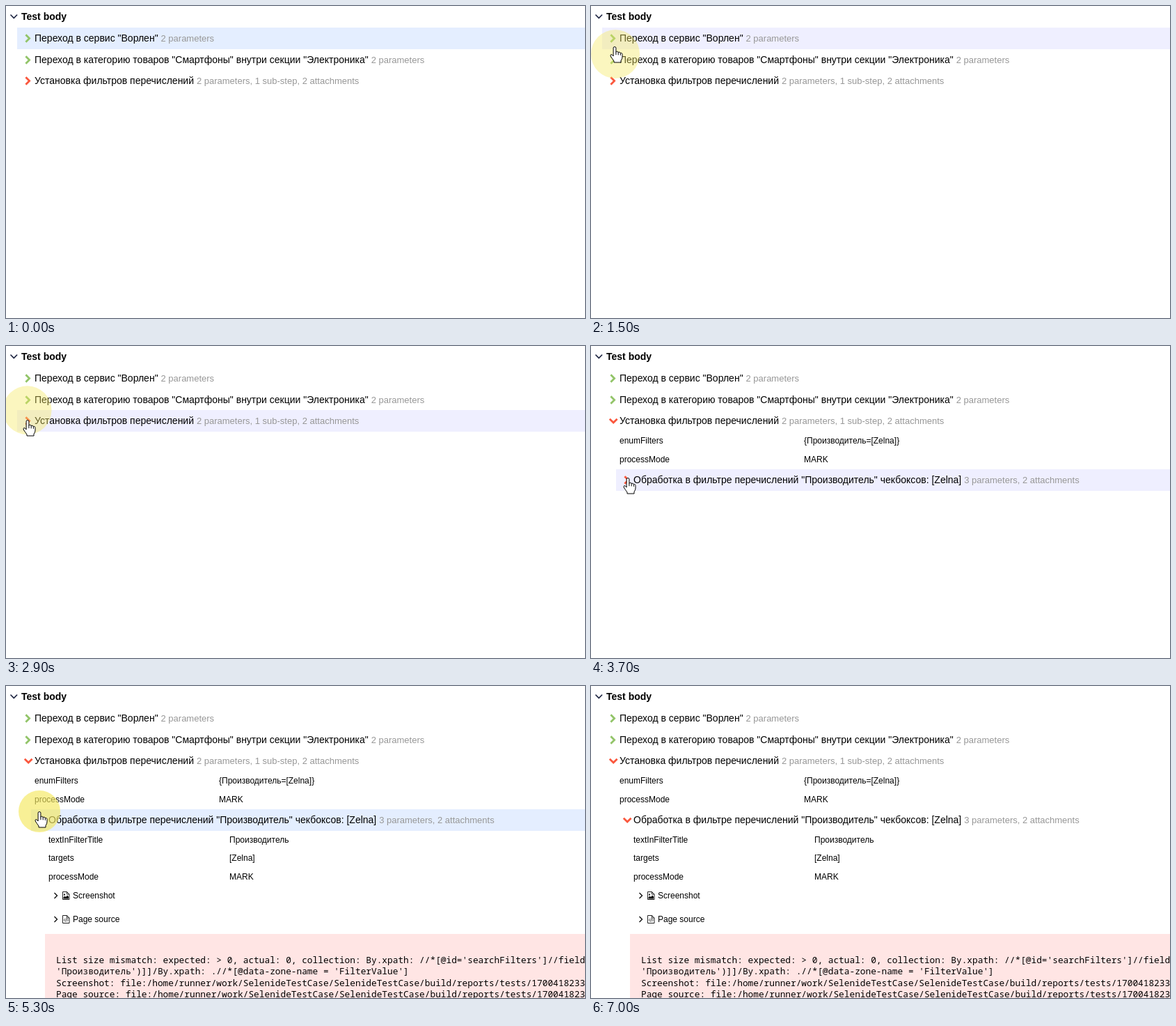
Recreate the animation shown at these times as an HTML page. Size 832 px wide and 448 px high, loop 8 s.

```html
<!DOCTYPE html>
<html lang="ru">
<head>
<meta charset="utf-8">
<title>Test body</title>
<style>
html, body { margin: 0; width: 100%; height: 100%; overflow: hidden; background: #fff; }
body { position: relative; font: 14px "Liberation Sans", Arial, sans-serif; color: #000; }
div { position: absolute; white-space: pre; }
svg { position: absolute; left: 0; top: 0; width: 1px; height: 1px; overflow: visible; fill: none; }
#head { left: 22px; top: 0; line-height: 30px; font-weight: bold; }
.row { right: 0; height: 31px; line-height: 31px; padding-left: 25px; }
.row small { font-size: 13px; color: #979797; }
.param { height: 26px; line-height: 26px; font-size: 12px; }
.file { left: 56px; right: 0; height: 27px; line-height: 27px; padding-left: 40px; font-size: 12px; }
#error { left: 56px; right: 0; top: 356px; height: 92px; background: #ffe5e4; overflow: hidden; }
#error div { left: 16px; top: 29px; font: 12.8px/16.4px "Noto Sans Mono", "DejaVu Sans Mono", monospace; }
#halo { width: 70px; height: 70px; border-radius: 50%; background: #f5e960; }
</style>
</head>
<body>
<script>
const GREEN = '#92c468', RED = '#fa573d';
const SERVICE = 'Ворлен', MAKER = 'Zelna';
const RIGHT = 'M12.4 10.3l5.2 5.2l-5.2 5.2', DOWN = 'M10.8 12.8l5.4 5.2l5.4-5.2';

const icon = (d, color, width) =>
  `<svg><path d="${d}" stroke="${color}" stroke-width="${width}"/></svg>`;
const row = (id, left, top, color, text, note) =>
  `<div class="row hover" id="${id}" style="left:${left}px;top:${top}px">` +
  `${icon(RIGHT, color, 2.8)}${text} <small>${note}</small></div>`;
const param = (left, top, gap, name, value) =>
  `<div class="param" style="left:${left}px;top:${top}px">${name}</div>` +
  `<div class="param" style="left:${left + gap}px;top:${top}px">${value}</div>`;
const file = (top, text, mark) =>
  `<div class="file hover" style="top:${top}px">${icon('M13.5 9l4 4l-4 4', '#111', 1.4)}` +
  `${icon('M25.5 7.5h6l3.5 3.5v7.5h-9.5zM31.5 7.5v3.5h3.5', '#222', 1)}${mark}${text}</div>`;

const path = 'file:/home/runner/work/SelenideTestCase/SelenideTestCase/build/reports/tests/1700418233';
document.body.innerHTML = `
<div id="head">${icon('M-15.5 12.5l4.8 4.8l4.8-4.8', '#1c2340', 1.6)}Test body</div>
${row('first', 16, 31, GREEN, `Переход в сервис "${SERVICE}"`, '2 parameters')}
<div id="firstBody">
${param(41, 62, 265, 'service', SERVICE)}${param(41, 89, 265, 'processMode', 'OPEN')}
</div>
<div id="rest" style="left:0;right:0;top:0">
${row('second', 16, 62, GREEN, 'Переход в категорию товаров "Смартфоны" внутри секции "Электроника"', '2 parameters')}
${row('third', 16, 92, RED, 'Установка фильтров перечислений', '2 parameters, 1 sub-step, 2 attachments')}
</div>
<div id="thirdBody" style="left:0;right:0;top:0">
${param(41, 123, 265, 'enumFilters', `{Производитель=[${MAKER}]}`)}
${param(41, 150, 265, 'processMode', 'MARK')}
${row('sub', 36, 177, RED, `Обработка в фильтре перечислений "Производитель" чекбоксов: [${MAKER}]`, '3 parameters, 2 attachments')}
</div>
<div id="subBody" style="left:0;right:0;top:0">
${param(61, 208, 260, 'textInFilterTitle', 'Производитель')}
${param(61, 234, 260, 'targets', `[${MAKER}]`)}
${param(61, 261, 260, 'processMode', 'MARK')}
${file(288, 'Screenshot', '<svg><path d="M26.5 17.5v-2l2-2l1.5 1.5l2-2.5l2 2v3zM27 10.5h2v2h-2z" fill="#111"/></svg>')}
${file(322, 'Page source', icon('M29 12l-1.7 2l1.7 2M31.6 12l1.7 2l-1.7 2M30.8 11.5l-1 5', '#222', .8))}
<div id="error"><div>List size mismatch: expected: &gt; 0, actual: 0, collection: By.xpath: //*[@id='searchFilters']//field
'Производитель')]]/By.xpath: .//*[@data-zone-name = 'FilterValue']
Screenshot: ${path}
Page source: ${path}</div></div>
</div>
<div id="halo" style="left:0;top:0"></div>
<svg id="hand" stroke="#000" stroke-linejoin="round">
<path fill="#fff" d="M-1.9 14V2.2Q-1.9.6 0 .6T1.9 2.2V8.6Q2 7.2 3.5 7.2T5.2 9Q5.4 8 6.8 8.2T8.4 10.2Q8.8 9.3 9.8 9.5Q11 9.9 11 11.5V15Q11 18 9 20.3V23H-1V21Q-4 17-5.8 14Q-6.5 12-5 11.6Q-3.6 11.4-1.9 14z"/>
<path d="M1.9 8.6v3.6M5.2 9v3.4M8.4 10.2v2.6"/></svg>`;

const $ = id => document.getElementById(id);
const hovers = [...document.querySelectorAll('.hover')];

// time, x, y of the fingertip
const route = [[0, 900, 46], [900, 880, 52], [1420, 35, 69], [1500, 34, 58], [1750, 31, 52],
  [2300, 29, 49], [2650, 29, 49], [2900, 31, 106], [3150, 31, 107], [3650, 53, 189],
  [4700, 53, 189], [4900, 48, 180], [5500, 48, 180], [6000, 206, 314], [6350, 206, 314], [6700, 900, 420]];
// time, opacity, radius
const glow = [[0, 0, 35], [900, 0, 35], [1100, .4, 35], [3200, .4, 35], [3500, 0, 35],
  [4600, 0, 30], [4700, .66, 30], [5500, .66, 30], [5700, 0, 30]];

function at(keys, t) {
  const i = keys.findIndex(k => k[0] > t);
  if (i < 1) return keys[i < 0 ? keys.length - 1 : 0].slice(1);
  const [a, b] = [keys[i - 1], keys[i]];
  const u = (t - a[0]) / (b[0] - a[0]), e = u * u * (3 - 2 * u);
  return [1, 2].map(n => a[n] + (b[n] - a[n]) * e);
}

function toggle(id, open) {
  $(id + 'Body').style.display = open ? 'block' : 'none';
  $(id).querySelector('path').setAttribute('d', open ? DOWN : RIGHT);
}

function draw(now) {
  const t = Math.floor(now % 8000 / 100) * 100;
  const firstOpen = t >= 1600 && t < 2200;
  toggle('first', firstOpen);
  toggle('third', t >= 3000);
  toggle('sub', t >= 4800);
  $('rest').style.top = firstOpen ? '54px' : '0';

  const [x, y] = at(route, t), [hx, hy] = at(route, t - 80), [alpha, r] = at(glow, t);
  $('hand').style.transform = `translate(${x}px,${y}px)`;
  $('halo').style.transform = `translate(${hx - 35}px,${hy - 35}px) scale(${r / 35})`;
  $('halo').style.opacity = alpha;

  const tint = t >= 500 && t < 4700 ? '#efefff' : '#e4eeff';
  for (const el of hovers) {
    const box = el.getBoundingClientRect();
    el.style.background = y >= box.top && y < box.bottom ? tint : '';
  }
  requestAnimationFrame(draw);
}
draw(0);
</script>
</body>
</html>
```
